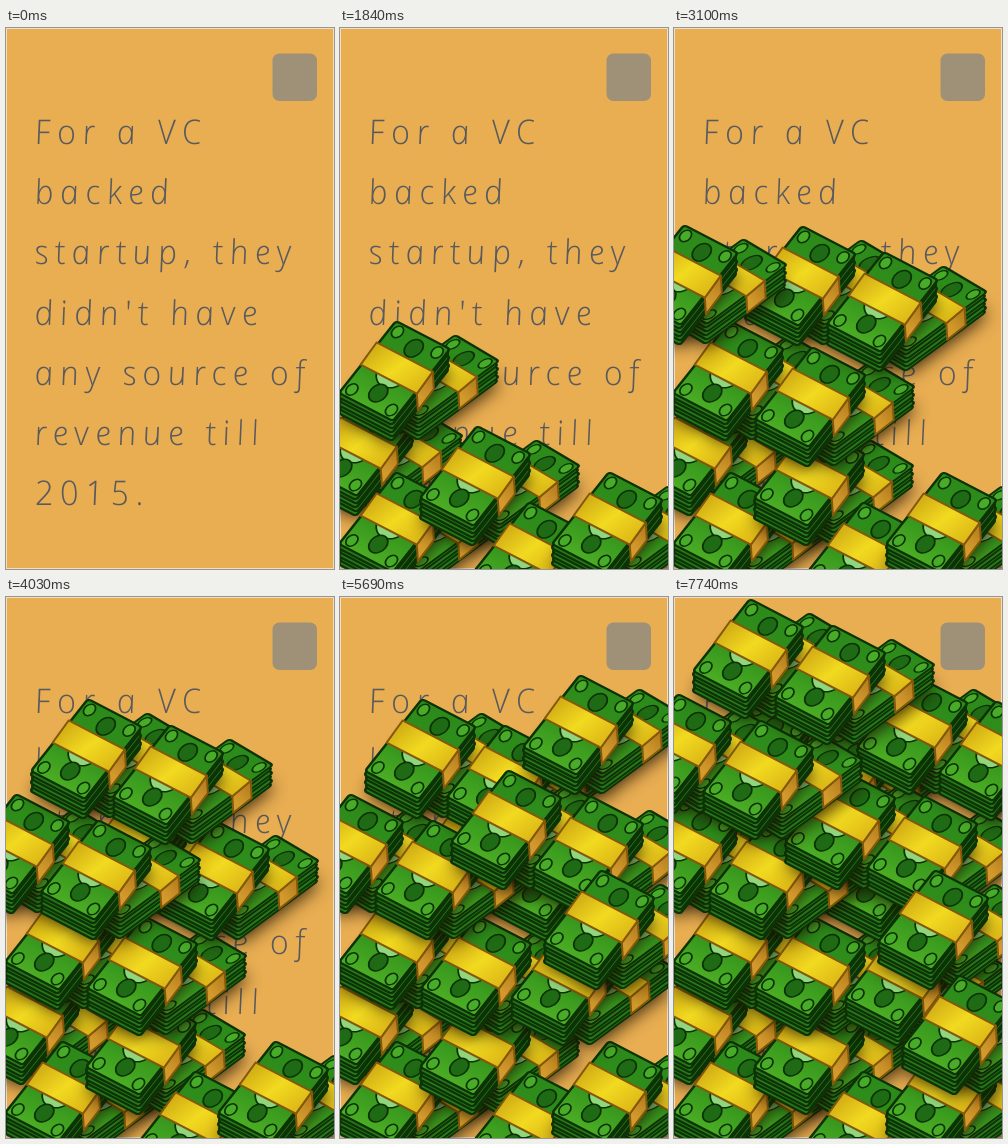
Recreate the animation shown at these times as an HTML page with a canvas. Size 328 by 541 pixels, loop 8 s.

```html
<!DOCTYPE html>
<html lang="en">
<head>
<meta charset="utf-8">
<title>Cash pile</title>
<style>
  html, body { margin: 0; width: 100%; height: 100%; overflow: hidden; }
  canvas { display: block; }
</style>
</head>
<body>
<canvas id="stage" width="328" height="541"></canvas>
<script>
const LOOP = 8000;
const LINES = ["For a VC", "backed", "startup, they", "didn't have", "any source of", "revenue till", "2015."];

// Four stacks on a slanted grid, from the left corner at (x, y).
const heap = (x, y) => [0, 1, 2, 3].map(i => {
  const back = i % 2, right = i >> 1;
  return [x + 72 * back + 82 * right, y - 95 * back + 26 * right];
});

const middle = heap(97, 171);
const DROPS = [
  [-51, 366], [-15, 442], [66, 396], [118, 472], [198, 442],
  ...heap(-15, 291),
  ...heap(-61, 195),
  middle[0], middle[1], [157, 327], middle[2], [190, 271], middle[3],
  ...heap(-67, 95),
  [214, 376]
];

// The drops come slightly slower and slower.
const landingTime = i => 500 + 228 * i ** 1.1;

function layer(width, height, paint) {
  const canvas = document.createElement("canvas");
  canvas.width = width;
  canvas.height = height;
  paint(canvas.getContext("2d"));
  return canvas;
}

function gradient(c, [x0, y0], [x1, y1], ...colors) {
  const g = c.createLinearGradient(x0, y0, x1, y1);
  colors.forEach((color, i) => g.addColorStop(i / (colors.length - 1), color));
  return g;
}

function paintCard(c) {
  c.fillStyle = "#f3dfc0";
  c.fillRect(0, 0, 328, 541);
  c.fillStyle = "#e9ae52";
  c.fillRect(1, 1, 326, 539);
  c.fillStyle = "#9e9178";
  c.beginPath();
  c.roundRect(266.5, 25.5, 44.5, 47.5, 7);
  c.fill();

  // A light italic set upright again gives round, pen-like letters.
  c.font = "italic 300 34px 'Open Sans', sans-serif";
  c.letterSpacing = "6.5px";
  c.fillStyle = "#595a5e";
  LINES.forEach((text, i) => {
    c.setTransform(1, 0, .17, 1, 30, 116 + i * 60.2);
    c.fillText(text, 0, 0);
  });
}

function oval(c, x, y, rx, ry, fill) {
  c.beginPath();
  c.ellipse(x, y, rx, ry, 0, 0, 7);
  c.fillStyle = fill;
  c.fill();
  c.stroke();
}

// One banknote in its own 60 x 90 space.
function paintNote(c, isTop, isBottom) {
  c.beginPath();
  c.roundRect(0, 0, 60, 90, 3);
  c.fillStyle = isTop ? gradient(c, [0, 0], [0, 90], "#2c8a1a", "#2f8f1b", "#4cae24") : "#27781a";
  if (isBottom) {
    c.shadowColor = "rgba(25,14,0,.85)";
    c.shadowBlur = 17;
    c.shadowOffsetX = 2;
    c.shadowOffsetY = 3;
  }
  c.fill();
  c.shadowColor = "transparent";
  c.strokeStyle = "#0c3206";
  c.lineWidth = 2.4;
  c.stroke();
  if (!isTop) return;
  c.lineWidth = 1.6;
  oval(c, 30, 46, 15, 18, "#8fd67c");
  for (const y of [16, 72]) oval(c, 31, y, 8, 10, "#1f6a14");
  for (const x of [8, 52])
    for (const y of [9, 81]) oval(c, x, y, 5, 6.5, "#48ac28");
}

function quad(c, points, fill) {
  c.beginPath();
  for (const [x, y] of points) c.lineTo(x, y);
  c.closePath();
  c.fillStyle = fill;
  c.fill();
  c.stroke();
}

// A strapped stack: top corner (x, y), short edge (ux, uy), long edge (vx, vy).
function paintBundle(c, [x, y], [ux, uy], [vx, vy], strapFrom, strapTo) {
  const thickness = 20;
  for (let dy = thickness; dy >= 0; dy -= 4) {
    c.save();
    c.transform(ux / 60, uy / 60, vx / 90, vy / 90, x + (dy % 8 ? -1 : 0), y + dy);
    paintNote(c, dy === 0, dy === thickness);
    c.restore();
  }
  const at = (u, v, drop) => [x + u * ux + v * vx, y + u * uy + v * vy + drop];
  const left = at(0, strapFrom, -3), right = at(1.04, strapFrom, -3), front = at(1.04, strapTo, -1);
  c.strokeStyle = "#84580a";
  c.lineWidth = 2;
  c.lineJoin = "round";
  quad(c, [right, front, at(1.06, strapTo, 15), at(1.06, strapFrom, 14)],
    gradient(c, front, right, "#d29a2c", "#b0781a"));
  quad(c, [left, right, front, at(0, strapTo, -1)],
    gradient(c, left, front, "#d0aa14", "#f2da20", "#dcb616"));
}

const card = layer(328, 541, paintCard);
const cash = layer(190, 145, c => {
  paintBundle(c, [130, 16], [44, 26], [-80, 59], .3, .53);
  paintBundle(c, [71, 2], [54, 28], [-57, 72], .34, .62);
});

const stage = document.getElementById("stage").getContext("2d");

function draw() {
  const time = performance.now() % LOOP;
  stage.drawImage(card, 0, 0);
  DROPS.forEach(([x, y], i) => {
    if (time >= landingTime(i)) stage.drawImage(cash, x, y);
  });
  requestAnimationFrame(draw);
}
draw();
</script>
</body>
</html>
```
